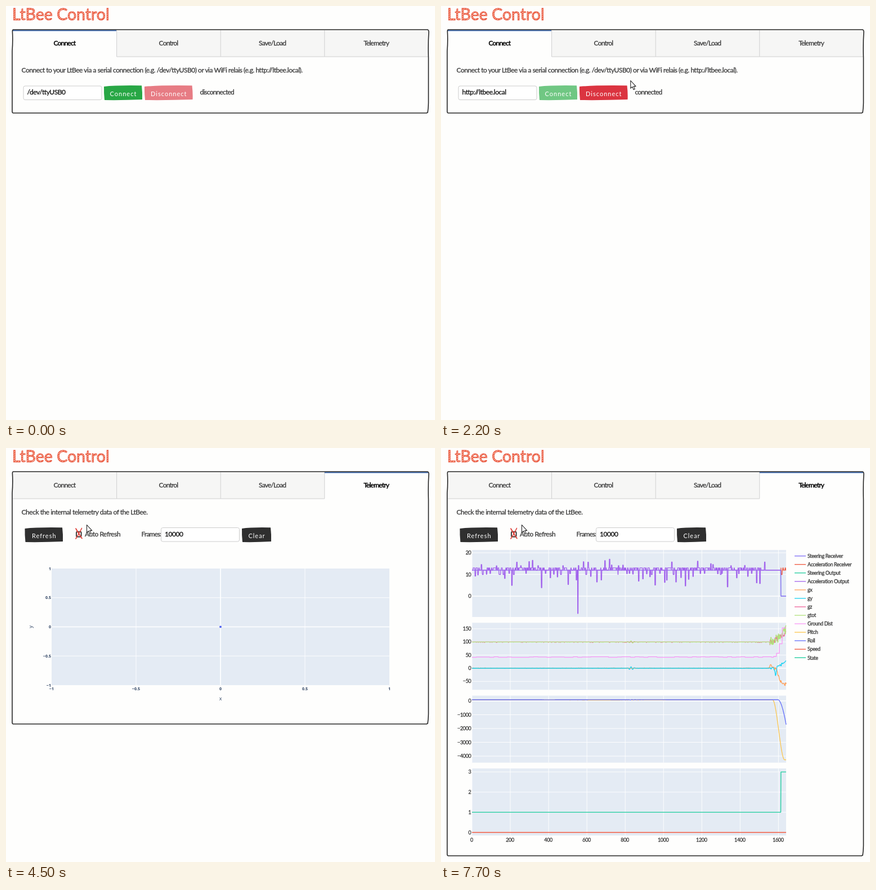
Animation of 762x735 px, one loop 8 s. Source, as an HTML page:

```html
<!DOCTYPE html>
<html lang="en">
<head>
<meta charset="utf-8">
<title>LtBee Control</title>
<style>
html, body { margin: 0; width: 100%; height: 100%; overflow: hidden; background: #fefefd; }
svg { display: block; width: 762px; height: 735px; }
text { font-family: Lato, "Open Sans", sans-serif; font-size: 12px; letter-spacing: -.47px; fill: #3b3b3b; stroke: #3b3b3b; stroke-width: .3px; white-space: pre; }
.tight { letter-spacing: -.8px; }
.mid { text-anchor: middle; }
.end { text-anchor: end; }
.on { fill: #000; stroke: #000; stroke-width: .5px; }
.field { fill: #111; stroke: #111; }
.btn { font-size: 11px; letter-spacing: 1px; fill: #fff; stroke: none; }
.title { font-size: 28.5px; letter-spacing: 0; fill: url(#hatch); stroke: #e8523a; stroke-width: .9px; }
.num { font: 700 7px "Open Sans", sans-serif; letter-spacing: 0; fill: #2a3f5f; stroke: none; }
.axis { font-size: 9px; font-weight: 400; }
.small { font-size: 9px; letter-spacing: -.34px; }
.line { fill: none; stroke-width: 1.3; stroke-linejoin: round; }
.grid { stroke: #fff; stroke-width: .9; }
.zero { stroke: #fff; stroke-width: 1.7; }
.rule { stroke: #cfcfcf; }
.plot { fill: #e4ebf4; }
.box { fill: #fff; stroke: #ccc; }
.ink { fill: #fff; stroke: #222; stroke-width: 1.1; stroke-linejoin: round; }
</style>
</head>
<body>
<svg id="stage" viewBox="0 0 762 735" xmlns="http://www.w3.org/2000/svg"></svg>
<script>
const LOOP = 8000, STEP = 100;
const ADDRESS = 'http://ltbee.local', PORT = '/dev/ttyUSB0';
const TABS = ['Connect', 'Control', 'Save/Load', 'Telemetry'];
const tabX = i => 12 + i * 184.6;
const C = {
  blue: '#636efa', red: '#ef553b', green: '#19cb9b', purple: '#a162ec', orange: '#ffa15a',
  cyan: '#19d3f3', rose: '#f0629a', lime: '#b2e27c', pink: '#fa98f6', yellow: '#fbc64f'
};
const LEGEND = [
  ['Steering Receiver', '#7d6cf6'], ['Acceleration Receiver', C.red], ['Steering Output', C.green],
  ['Acceleration Output', C.purple], ['gx', C.orange], ['gy', C.cyan], ['gz', C.rose], ['gtot', C.lime],
  ['Ground Dist', C.pink], ['Pitch', C.yellow], ['Roll', C.blue], ['Speed', C.red], ['State', C.green]
];

// ---------- telemetry signals: n is the sample number ----------
const BUMP = 830, FALL = 1555, STOP = 1612;
const clamp = (v, a, b) => Math.max(a, Math.min(b, v));
const smooth = (a, b, v) => { const u = clamp((v - a) / (b - a), 0, 1); return u * u * (3 - 2 * u); };
const rnd = i => { const s = Math.sin(i * 12.9898 + 4.1) * 43758.5453; return s - Math.floor(s); };
const hold = (n, k, seed) => rnd(Math.floor(n / k) + seed);
const bell = (n, mid, width) => Math.exp(-(((n - mid) / width) ** 2));
const late = n => clamp((n - FALL) / 85, 0, 1);
const shake = (n, k, seed, size) => n > FALL ? (hold(n, k, seed) - .5) * size : 0;
const fleck = (n, seed, size) => hold(n, 2, seed) > .88 ? size : 0;
const ripple = n => bell(n, BUMP + 2, 15) * Math.sin(n * .35);

function accel(n) {
  if (n > 1530) return 12;
  if (Math.abs(n - 553) < 2) return -8;
  const block = Math.floor(n / 22), at = block * 22 + 3 + 16 * rnd(block + 900);
  if (Math.abs(n - at) < 2) {
    const size = rnd(block + 700);
    return rnd(block + 300) > .42 ? 10.5 - 7.5 * size ** 3 : 14 + 6 * size ** 2;
  }
  return hold(n, 6, 500) > .96 ? 10 : hold(n, 3, 0) > .5 ? 13 : 12;
}
const command = n => n > STOP ? 0 : 12;
const receiver = n => hold(n, 6, 2) > .85 ? 10 : 12 + Math.round(hold(n, 3, 1));
const gx = n => 10 * bell(n, FALL + 4, 6) - 62 * smooth(1582, 1622, n) + fleck(n, 60, 1) + shake(n, 4, 3, 12);
const gy = n => 32 * late(n) ** 2.5 - 26 * bell(n, 1585, 5) - fleck(n, 75, .9) + 5.5 * ripple(n) + shake(n, 4, 8, 9);
const gz = n => 99.7 + 38 * late(n) ** 1.4 - fleck(n, 30, 1.2) + shake(n, 3, 21, 22);
const gtot = n => 100 + 48 * late(n) ** 1.6 - fleck(n, 90, .8) + 4 * ripple(n) + shake(n, 3, 7, 34);
const ground = n => n < 1575
  ? 41.5 + Math.floor(hold(n, 23, 11) * 3)
  : 45 + 12 * Math.min(3, Math.floor((n - 1575) / 15)) ** 2;
const jitter = (n, seed) => (hold(n, 5, seed) - .5) * .9;

function roll(n) {
  const calm = 81.5 + 6 * bell(n, 665, 55) - 3 * bell(n, 400, 50) + 4.5 * bell(n, 930, 80)
    + 1.5 * bell(n, 1195, 12) + jitter(n, 80);
  const ring = n < 823 ? 0 : -20 * Math.exp((827 - n) / 32) * Math.cos((n - 827) * Math.PI / 8.25);
  return Math.round(calm) + ring - 1800 * clamp((n - 1598) / 42, 0, 1) ** 1.8;
}
const pitch = n => Math.round(64 + 1.5 * bell(n, 220, 50) - 1.5 * bell(n, 690, 110) + 2.5 * bell(n, 1130, 85) + jitter(n, 40))
  + 6 * bell(n, BUMP, 5) - 4330 * smooth(1570, 1632, n);

// ---------- markup helpers ----------
const txt = (x, y, s, cls = '', more = '') => `<text x="${x}" y="${y}" class="${cls}" ${more}>${s}</text>`;
const rect = (x, y, w, h, more) => `<rect x="${x}" y="${y}" width="${w}" height="${h}" ${more}/>`;
const seg = (x1, y1, x2, y2, cls, more = '') => `<path d="M${x1} ${y1}L${x2} ${y2}" class="${cls}" ${more}/>`;
const label = v => String(v).replace('-', '\u2212');
const button = (x, w, s, fill, id = '') =>
  `<path id="${id}" fill="${fill}" d="M${x} 143Q${x + w / 3} 140.5 ${x + w - 1} 141.3Q${x + w + .5} 154 ${x + w} 166Q${x + w / 2} 167.5 ${x + 1} 167Q${x - .3} 155 ${x} 143Z"/>`
  + txt(x + w / 2 + .5, 160, s, 'btn mid');

function series(fn, px, y, from, to, color) {
  let d = '';
  for (let n = from; n <= to; n++) d += (d ? 'L' : 'M') + (55 + n * px).toFixed(1) + ' ' + y(fn(n)).toFixed(1);
  return `<path class="line" d="${d}" stroke="${color}"/>`;
}

// Each panel: pixel of value zero, pixels per unit, first tick, last tick, tick step
function charts(id, count, panels) {
  const px = 558 / count, quiet = Math.min(count, STOP);
  const ys = panels.map(([zero, unit]) => v => zero - v * unit);
  let s = '';
  panels.forEach(([, , first, last, step], i) => {
    const top = 181 + 129.3 * i;
    s += rect(55, top, 558, 119, 'class="plot"');
    for (let n = 0; n <= count; n += 200) s += seg(55 + n * px, top, 55 + n * px, top + 119, 'grid');
    for (let v = first; v <= last; v += step) {
      s += seg(55, ys[i](v), 613, ys[i](v), v ? 'grid' : 'zero') + txt(53.5, ys[i](v) + 3, label(v), 'small end');
    }
  });
  for (let n = 0; n <= count; n += 200) s += txt(54.5 + n * px, 699, n, 'small mid');
  const draw = (i, fn, color, from = 0, to = count) => { s += series(fn, px, ys[i], from, to, color); };
  draw(0, command, '#8d62ee', 0, quiet);
  draw(0, accel, C.purple, 0, quiet);
  if (count > STOP) {
    draw(0, receiver, C.red, STOP);
    draw(0, command, '#7967ee', STOP);
  }
  draw(1, gx, C.orange);
  draw(1, gy, C.cyan);
  draw(1, gz, C.rose);
  draw(1, gtot, C.lime);
  draw(1, ground, C.pink);
  draw(2, pitch, C.yellow);
  draw(2, roll, C.blue);
  draw(3, () => 0, C.red);
  draw(3, n => n > STOP ? 3 : 1, C.green);
  return `<g id="${id}">${s}</g>`;
}
const FLAT = [[263, 3.85, 0, 20, 10], [417.5, .98, 0, 100, 50], [732.5, 2.9, 60, 100, 10], [682.5, 107.5, 0, 1, .5]];
const CRASH = [FLAT[0], [391, .467, -50, 150, 50], [449, .0245, -4000, 0, 1000], [682.5, 35.8, 0, 3, 1]];

function emptyPlot() {
  let s = rect(81, 214, 600, 207, 'class="plot"');
  for (let v = -1; v <= 1; v += .5) {
    const x = 381 + 300 * v, y = 317.5 - 103.5 * v, cls = v ? 'grid' : 'zero';
    if (Math.abs(v) < 1) s += seg(x, 214, x, 421, cls) + seg(81, y, 681, y, cls);
    s += txt(x, 429.5, label(v), 'num mid') + txt(80, y + 2.5, label(v), 'num end');
  }
  s += txt(381, 447.5, 'x', 'num axis mid')
    + txt(0, 0, 'y', 'num axis mid', 'transform="translate(47 317.5) rotate(-90)"')
    + rect(379.2, 315.7, 3.6, 3.6, 'rx="1" fill="#4f63f0"');
  return `<g id="empty">${s}</g>`;
}

const legend = LEGEND.map(([name, color], i) => {
  const y = 191.7 + i * 15.05;
  return seg(628, y, 648, y, 'line', `stroke="${color}"`) + txt(651, y + 3.2, name, 'small');
}).join('');

const tabs = TABS.map((s, i) => {
  const a = tabX(i), b = tabX(i + 1);
  return rect(a, 43, b - a, 47, `id="tab${i}"`)
    + (i ? seg(a, 43, a, 90, 'rule') : '')
    + seg(a, 90, b, 90, 'rule', `id="under${i}"`)
    + txt((a + b) / 2 - .4, 69.5, s, '', `id="name${i}"`);
}).join('');

document.getElementById('stage').innerHTML = `
<defs><pattern id="hatch" width="4" height="3" patternUnits="userSpaceOnUse" patternTransform="rotate(-38)">
<rect width="4" height="3" fill="#fbd9cf"/><rect width="4" height="1.9" fill="#ee6143"/></pattern></defs>
<rect width="762" height="735" fill="#fefefd"/>
${txt(11, 24.5, 'LtBee Control', 'title')}
${tabs}
<rect id="accent" y="42.5" height="2" width="184" fill="#3e6db5"/>
<path id="card" fill="none" stroke="#262626" stroke-width="1.6" stroke-linejoin="round"/>
<g id="connect">
${txt(27.5, 118, 'Connect to your LtBee via a serial connection (e.g. /dev/ttyUSB0) or via WiFi relais (e.g. http://ltbee.local).')}
${rect(31, 142, 139, 24.5, 'id="input" class="box" rx="3"')}
<rect id="select" y="146" height="15" fill="#a9cdf3"/>
${txt(37.5, 157, PORT, 'field', 'id="value"')}
<path id="spell" fill="none" stroke="#e23c3c" stroke-width=".9"/>
<path id="caret" stroke="#000"/>
${button(174, 68, 'Connect', '#28a745', 'go')}
${button(246, 85.5, 'Disconnect', '#e77c84', 'stop')}
${txt(344.5, 157, '', 'tight', 'id="status"')}
</g>
<g id="telemetry">
${txt(27.5, 118, 'Check the internal telemetry data of the LtBee.')}
${button(33.5, 67.5, 'Refresh', '#2f2f2f')}
${rect(125, 148.7, 8.6, 9, 'rx="1.5" fill="#fff" stroke="#222" stroke-width="1.7"')}
<path id="tick" d="M124 143Q128 151 135 160.5M134.5 142.5Q131 150 124 161M125 144.5L134 159.5" fill="none" stroke="#e0463f" stroke-width="1.7" stroke-linecap="round"/>
${txt(140, 157, 'Auto Refresh')}
${txt(240.5, 157, 'Frames:', 'tight')}
${rect(275.5, 141.5, 139, 24.5, 'class="box" rx="3"')}
${txt(282, 157, '10000', 'field')}
${button(419, 52, 'Clear', '#2f2f2f')}
${emptyPlot()}
<g id="legend">${legend}</g>
${charts('chart0', 1251, FLAT)}
${charts('chart1', 1400, FLAT)}
${charts('chart2', 1640, CRASH)}
</g>
<g id="cursor">
<path id="arrow" class="ink" d="M.5 .5V14.2L3.6 11.4L5.8 16.6L8 15.6L5.8 10.6H9.8Z"/>
<g id="hand"><path class="ink" d="M-1.3 8.5V1.4Q0 -.6 1.4 1.4V5.4Q4.4 5 7 6.6Q8.3 7.2 8 9.6L6.8 14.4H-.6L-4.6 9.4Q-4.4 7.6 -2.6 8.2L-1.3 9.6Z"/>
<path d="M1.6 7V9M4 7V9M6 7.5V9" stroke="#222" stroke-width=".8"/></g>
<path id="beam" d="M-3 -7H3M0 -7V7M-3 7H3" stroke="#222" fill="none"/>
</g>`;

const ui = {};
document.querySelectorAll('#stage [id]').forEach(e => { if (e.id) ui[e.id] = e; });
const show = (e, on) => e.setAttribute('display', on ? 'inline' : 'none');
const set = (e, o) => { for (const k in o) e.setAttribute(k, o[k]); };

// Pointer moves: from ms, to ms, end x, end y
const MOVES = [
  [100, 900, 25, 155], [1100, 1500, 316, 152], [1500, 1800, 208, 152], [2000, 2600, 703, 75],
  [2700, 2800, 700, 72], [3100, 3700, 152, 146], [4400, 4500, 143, 136]
];
function pointer(t) {
  let x = 628, y = 178;
  for (const [a, b, tx, ty] of MOVES) {
    const u = smooth(a, b, t);
    x += (tx - x) * u;
    y += (ty - y) * u;
  }
  return [x, y];
}

function drawInput(t, x) {
  const count = t < 1200 ? 0 : clamp(Math.floor(2 + (t - 1200) / 40), 0, ADDRESS.length);
  const focus = t >= 700 && t < 2000;
  ui.value.textContent = count ? ADDRESS.slice(0, count) : PORT;
  ui.input.style.stroke = focus ? '#45bfe6' : '#ccc';
  const left = 37.5, end = left + ui.value.getComputedTextLength(), from = clamp(x, left, end);
  show(ui.select, focus && !count);
  set(ui.select, { x: from, width: end - from });
  show(ui.caret, focus && count > 0);
  set(ui.caret, { d: `M${end + .5} 147V160` });
  show(ui.spell, focus && count > 3);
  let d = `M${left} 159.5`;
  for (let i = 1; left + i * 1.5 < end; i++) d += `L${left + i * 1.5} ${i % 2 ? 158.3 : 159.5}`;
  set(ui.spell, { d });
}

function draw(ms) {
  const t = Math.floor(ms / STEP) * STEP;
  const tele = t >= 3100, full = t >= 5800, linked = t >= 2100;
  const active = tele ? 3 : 0, b = full ? 724 : tele ? 490 : 190;

  TABS.forEach((_, i) => {
    const on = i === active;
    ui['tab' + i].setAttribute('fill', on ? '#fefefd' : '#f6f6f5');
    show(ui['under' + i], !on);
    ui['name' + i].setAttribute('class', 'tight mid' + (on ? ' on' : ''));
  });
  set(ui.accent, { x: tabX(active) });
  set(ui.card, { d: `M13 42H748Q751 42 751 46Q749.6 68 750.4 92V${b - 18}Q750 ${b - 7} 749 ${b - 1}L747 ${b}H13Q11 ${b} 11 ${b - 3}V80Q12.4 62 11.4 45Q11.4 42 13 42Z` });

  const [x, y] = pointer(t);
  const inRow = !tele && y > 141 && y < 167;
  const overGo = inRow && x > 174 && x < 242 && !linked;
  const beam = inRow && x > 31 && x < 170;
  const hand = overGo || (y > 43 && y < 90);
  show(ui.cursor, t >= 100);
  set(ui.cursor, { transform: `translate(${x.toFixed(1)} ${y.toFixed(1)})` });
  show(ui.arrow, !beam && !hand);
  show(ui.hand, hand);
  show(ui.beam, beam);

  show(ui.connect, !tele);
  show(ui.telemetry, tele);
  if (!tele) {
    drawInput(t, x);
    ui.go.setAttribute('fill', linked ? '#70c783' : overGo ? '#1f8a37' : '#28a745');
    ui.stop.setAttribute('fill', linked ? '#db3440' : '#e77c84');
    ui.status.textContent = linked ? 'connected' : 'disconnected';
  }
  show(ui.tick, t >= 4100);
  show(ui.empty, !full);
  show(ui.legend, full);
  show(ui.chart0, full && t < 6500);
  show(ui.chart1, t >= 6500 && t < 7600);
  show(ui.chart2, t >= 7600);
}

const start = performance.now();
function frame() {
  draw((performance.now() - start) % LOOP);
  requestAnimationFrame(frame);
}
frame();
</script>
</body>
</html>
```
